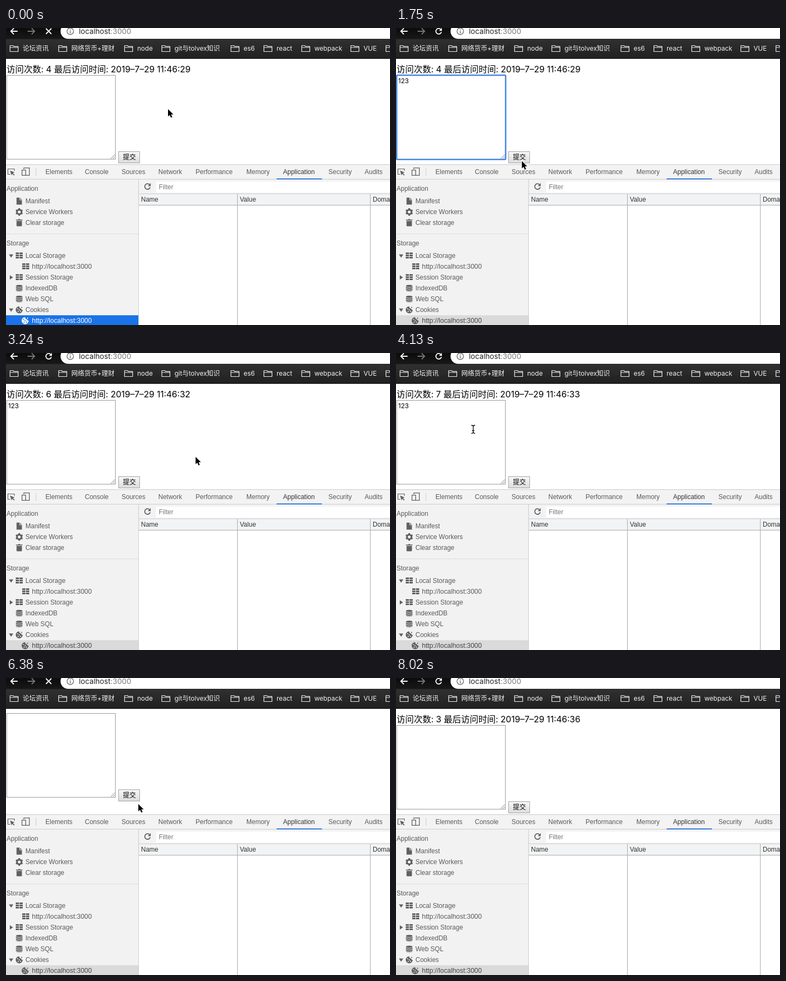
Recreate the animation shown at these times as an HTML page. Size 711 by 549 pixels, loop 8180 ms.

```html
<!DOCTYPE html>
<html lang="zh-CN">
<head>
<meta charset="utf-8">
<title>Visit counter</title>
<style>
  html, body { margin: 0; width: 100%; height: 100%; overflow: hidden; background: #fff; }
  svg { display: block; }
  text { font: 12px "Liberation Sans", Arial, sans-serif; fill: #5a5a5a; white-space: pre; }
  .ui { font: 12px Inter, "Noto Sans CJK SC", sans-serif; }
  .url { font-size: 13.7px; }
  .page { font-size: 16px; fill: #000; }
  .host { font-size: 12.4px; }
  .line { fill: none; stroke: currentColor; }
</style>
</head>
<body>
<svg id="stage" width="711" height="549" viewBox="0 0 711 549"></svg>
<script>
const LOOP = 8180, STEP = 148.7;
const stage = document.getElementById('stage');

const rect = (x, y, w, h, fill, more = '') =>
  `<rect x="${x}" y="${y}" width="${w}" height="${h}" fill="${fill}" ${more}/>`;
const text = (x, y, s, cls = '', fill = '') =>
  `<text x="${x}" y="${y}" class="${cls}" ${fill && `style="fill:${fill}"`}>${s}</text>`;
const line = (d, color, width = 1, more = '') =>
  `<path d="${d}" class="line" stroke-width="${width}" style="color:${color}" ${more}/>`;
const at = (x, y, s) => `<g transform="translate(${x} ${y})">${s}</g>`;

// Icons, centred on their own origin
const GREY = '#606060';
const reload = (color, width) =>
  line('M3.6 -3.6A5.1 5.1 0 1 0 5 1.2', color, width) +
  `<path d="M6 -6.2V-.8H.6Z" fill="${color}"/>`;
const folder = line('M-7.5 5.5V-5.5H-2L-.5 -3.8H7.5V5.5ZM-7.5 -2H7.5', '#eee', 1.2, 'stroke-linejoin="round"');
const table = [-5, -1, 3].map(y => rect(-6.5, y - 1, 6, 3, GREY) + rect(.5, y - 1, 6, 3, GREY)).join('');
const database = `<path d="M-6 -4V4C-6 7 6 7 6 4V-4Z" fill="${GREY}"/><ellipse cy="-4" rx="6" ry="2.3" fill="${GREY}"/>` +
  [-3.6, -.2, 3.2].map(y => line(`M-6 ${y}C-6 ${y + 2.6} 6 ${y + 2.6} 6 ${y}`, '#f2f2f2')).join('');
const file = `<path d="M-5 -6.5H1L5 -2.5V6.5H-5Z" fill="${GREY}"/>` + line('M1 -6.5V-2.2H5', '#f2f2f2');
const gear = `<circle r="4.2" fill="none" stroke="${GREY}" stroke-width="3.2"/>` +
  [0, 60, 120].map(a => line('M0 -7V-5M0 5V7', GREY, 3, `transform="rotate(${a})"`)).join('');
const trash = `<path d="M-5 -3.5H5V5Q5 6.5 3.5 6.5H-3.5Q-5 6.5 -5 5ZM-6 -6H-2L-1 -7H1L2 -6H6V-4.5H-6Z" fill="${GREY}"/>`;
const cookie = (color, hole) => `<path d="M0 -6.5A6.5 6.5 0 1 0 6.5 0Q4 .5 3.5 -2.5Q0 -2.5 0 -6.5Z" fill="${color}"/>` +
  [[-3, -2], [-2, 3], [2.3, 2.7], [0, 0]].map(([x, y]) => `<circle cx="${x}" cy="${y}" r="1.1" fill="${hole}"/>`).join('') +
  `<circle cx="4.5" cy="-4.5" r="1.1" fill="${color}"/>`;

const bookmarks = [[7, '论坛资讯'], [97, '网络货币+理财'], [219, 'node'], [288, 'git与tolvex知识'],
  [416, 'es6'], [477, 'react'], [547, 'webpack'], [638, 'VUE'], [703, '']];
const tabs = [[73, 'Elements'], [146, 'Console'], [214, 'Sources'], [282, 'Network'], [351, 'Performance'],
  [445, 'Memory'], [513, 'Application'], [597, 'Security'], [664, 'Audits']];
const items = [[320, 'Manifest', file], [340, 'Service Workers', gear], [360, 'Clear storage', trash],
  [421, 'Local Storage', table], [461, 'Session Storage', table], [481, 'IndexedDB', database],
  [501, 'Web SQL', database], [521, 'Cookies', cookie(GREY, '#f2f2f2')]];
const host = 'http://localhost:3000';

const browser = `
  <linearGradient id="dark" x2="0" y2="1"><stop stop-color="#0c0c0c"/><stop offset=".34" stop-color="#171717"/>
    <stop offset=".38" stop-color="#303030"/><stop offset="1" stop-color="#202020"/></linearGradient>
  <linearGradient id="face" x2="0" y2="1"><stop stop-color="#f8f8f8"/><stop offset="1" stop-color="#dcdcdc"/></linearGradient>` +
  rect(0, 0, 711, 57, 'url(#dark)') + rect(0, 56, 711, 1, '#111') +
  rect(101, -8, 640, 28, '#fff', 'rx="14"') +
  line('M21.5 6H9M14.5 .5L9 6L14.5 11.5', '#fff', 1.8) +
  line('M40 6H53M47.5 .5L53 6L47.5 11.5', '#777', 1.8) +
  `<g id="reload">${at(79, 6, reload('#fff', 1.8))}</g>` +
  line('M74 1L84 11M84 1L74 11', '#fff', 1.8, 'id="stop"') +
  at(119, 6, '<circle r="6" fill="none" stroke="#666" stroke-width="1.3"/>' + line('M0 -3.3V-1.7M0 -.5V3.4', '#666', 1.5)) +
  text(135, 11, 'localhost<tspan fill="#777" style="fill:#777">:3000</tspan>', 'ui url', '#222') +
  bookmarks.map(([x, s]) => at(x + 8, 38, folder) + text(x + 24, 42, s, 'ui', '#f2f2f2')).join('');

const page = text(1, 82, '', 'ui page" id="visits') + '<g id="form">' +
  rect(1.5, 87.5, 201, 155, '#fff', 'stroke="#999"') +
  line('M194 241.5L201.5 234M198 241.5L201.5 238', '#777') +
  rect(1.2, 87.2, 201.8, 155.8, 'none', 'id="ring" stroke="#4585e6" stroke-width="2.6" rx="1.5"') +
  text(4, 102, '', 'ui" id="value', '#000') + rect(4, 91, 1, 14, '#000', 'id="caret"') +
  rect(208.5, 228.5, 39, 21, 'url(#face)', 'stroke="#a2a2a2"') +
  text(216.5, 243, '提交', 'ui', '#000') + '</g>';

const devtools = rect(0, 252, 711, 28, '#f3f3f3') + rect(0, 252, 711, 1, '#cacaca') + rect(0, 279, 711, 1, '#ccc') +
  line('M8 270.5H3.5V260.5H15.5V264', GREY, 1.2) +
  `<path d="M7.5 263.5L16 267L12.8 268.3L16 271.5L14.8 272.7L11.6 269.5L10.3 272.5Z" fill="${GREY}"/>` +
  line('M33 261V258.7H43.3V272.3H37M29.6 262.6H36.4V272.4H29.6Z', GREY, 1.3) +
  rect(55, 259, 1, 14, '#ccc') +
  tabs.map(([x, s]) => text(x, 270, s, '', s === 'Application' ? '#333' : '')).join('') +
  rect(501, 278, 84, 2, '#3a7bdc') +
  rect(0, 280, 245, 269, '#f2f2f2') + rect(245, 280, 1, 269, '#ccc') +
  rect(246, 280, 465, 27, '#f3f3f3') + rect(278, 284, 433, 20, '#fff') +
  at(262, 293, reload(GREY, 1.8)) + text(283, 298, 'Filter', '', '#777') +
  rect(246, 306, 465, 22, '#f1f3f4') + rect(246, 306, 465, 1, '#ccc') + rect(246, 327, 465, 1, '#aaa') +
  rect(428, 307, 1, 242, '#aaa') + rect(674, 307, 1, 242, '#aaa') +
  [[250, 'Name'], [433, 'Value'], [679, 'Domain']].map(([x, s]) => text(x, 321, s, '', '#333')).join('') +
  text(1, 301, 'Application') + rect(0, 380, 245, 1, '#ddd') + text(1, 402, 'Storage') +
  items.map(([y, s, icon]) => at(24.5, y, icon) + text(36, y + 4, s)).join('') +
  `<path d="M5.5 418.5H13.5L9.5 424.5ZM7 457L13 461L7 465ZM5.5 518.5H13.5L9.5 524.5Z" fill="${GREY}"/>` +
  at(36.5, 441, table) + text(48, 445, host, 'host') +
  '<g id="active">' + rect(0, 531, 245, 18, '#1a73e8') + at(35.5, 541, cookie('#fff', '#1a73e8')) +
  text(48, 545, host, 'host', '#fff') + '</g>' +
  '<g id="inactive">' + rect(0, 531, 245, 18, '#dadada') + at(35.5, 541, cookie(GREY, '#dadada')) +
  text(48, 545, host, 'host', '#444') + '</g>';

const pointer = `<g id="pointer">
  <path id="arrow" d="M0 0V13.6L3.2 10.7L5.5 15.8L7.8 14.8L5.6 9.8H9.8Z" stroke="#fff" paint-order="stroke" stroke-width="1.8"/>
  ${line('M-3.5 -7.5Q0 -7.5 0 -5Q0 -7.5 3.5 -7.5M0 -5V5M-3.5 7.5Q0 7.5 0 5Q0 7.5 3.5 7.5M-2 2.5H2', '#000', 1.3, 'id="ibeam"')}</g>`;

stage.innerHTML = browser + page + devtools + pointer;

// State changes by step; each one builds on those before it
const changes = [
  [0, { visits: [4, 29], loading: true, active: true, focus: false, value: '', caret: false, pointer: true }],
  [1, { loading: false }],
  [3, { focus: true, caret: true, active: false, pointer: false }],
  [5, { value: '12' }],
  [7, { value: '123' }],
  [8, { pointer: true, caret: false }],
  [14, { focus: false, loading: true }],
  [15, { visits: [5, 31] }],
  [16, { loading: false }],
  [20, { loading: true }],
  [21, { visits: null }],
  [22, { visits: [6, 32], loading: false }],
  [26, { loading: true }],
  [27, { visits: [7, 33] }],
  [28, { loading: false }],
  [29, { focus: true }],
  [32, { value: '' }],
  [34, { focus: false }],
  [35, { loading: true, visits: [1, 35] }],
  [38, { loading: false }],
  [42, { loading: true }],
  [43, { visits: null }],
  [44, { visits: [2, 36] }],
  [45, { loading: false }],
  [47, { loading: true }],
  [48, { visits: [3, 36] }],
  [49, { loading: false }],
  [54, { pointer: false }],
];
// Pointer waypoints: step, x, y
const route = [[0, 300, 150], [2, 155, 141], [7, 140, 145], [10, 215, 210], [11, 251, 257], [12, 233, 246],
  [19, 233, 246], [22, 351, 192], [25, 351, 192], [28, 143, 141], [31, 143, 141], [35, 372, 193], [36, 372, 193],
  [38, 310, 212], [41, 245, 233], [48, 245, 233], [53, 665, 548], [55, 665, 548]];

function pointerAt(step) {
  const i = route.findIndex(p => p[0] > step);
  const [s0, x0, y0] = route[i - 1], [s1, x1, y1] = route[i];
  const k = (step - s0) / (s1 - s0);
  return [x0 + (x1 - x0) * k, y0 + (y1 - y0) * k];
}

const el = id => document.getElementById(id);
const show = (id, on) => el(id).setAttribute('visibility', on ? 'visible' : 'hidden');

function draw(step) {
  const s = Object.assign({}, ...changes.filter(c => c[0] <= step).map(c => c[1]));
  const [x, y] = pointerAt(step);
  const overField = x < 203 && y > 87 && y < 243;
  el('visits').textContent = s.visits
    ? `访问次数: ${s.visits[0]} 最后访问时间: 2019–7–29 11:46:${s.visits[1]}` : '';
  el('form').setAttribute('transform', `translate(0 ${s.visits ? 0 : -22})`);
  el('value').textContent = s.value;
  el('caret').setAttribute('x', 4 + (s.value ? el('value').getComputedTextLength() : 0));
  el('pointer').setAttribute('transform', `translate(${x} ${y})`);
  show('stop', s.loading);
  show('reload', !s.loading);
  show('active', s.active);
  show('inactive', !s.active);
  show('ring', s.focus);
  show('caret', s.caret);
  show('arrow', s.pointer && !overField);
  show('ibeam', s.pointer && overField);
}

const start = performance.now();
function tick() {
  const time = (performance.now() - start) % LOOP;
  draw(Math.min(54, Math.floor(time / STEP + .26)));
  requestAnimationFrame(tick);
}
tick();
</script>
</body>
</html>
```
